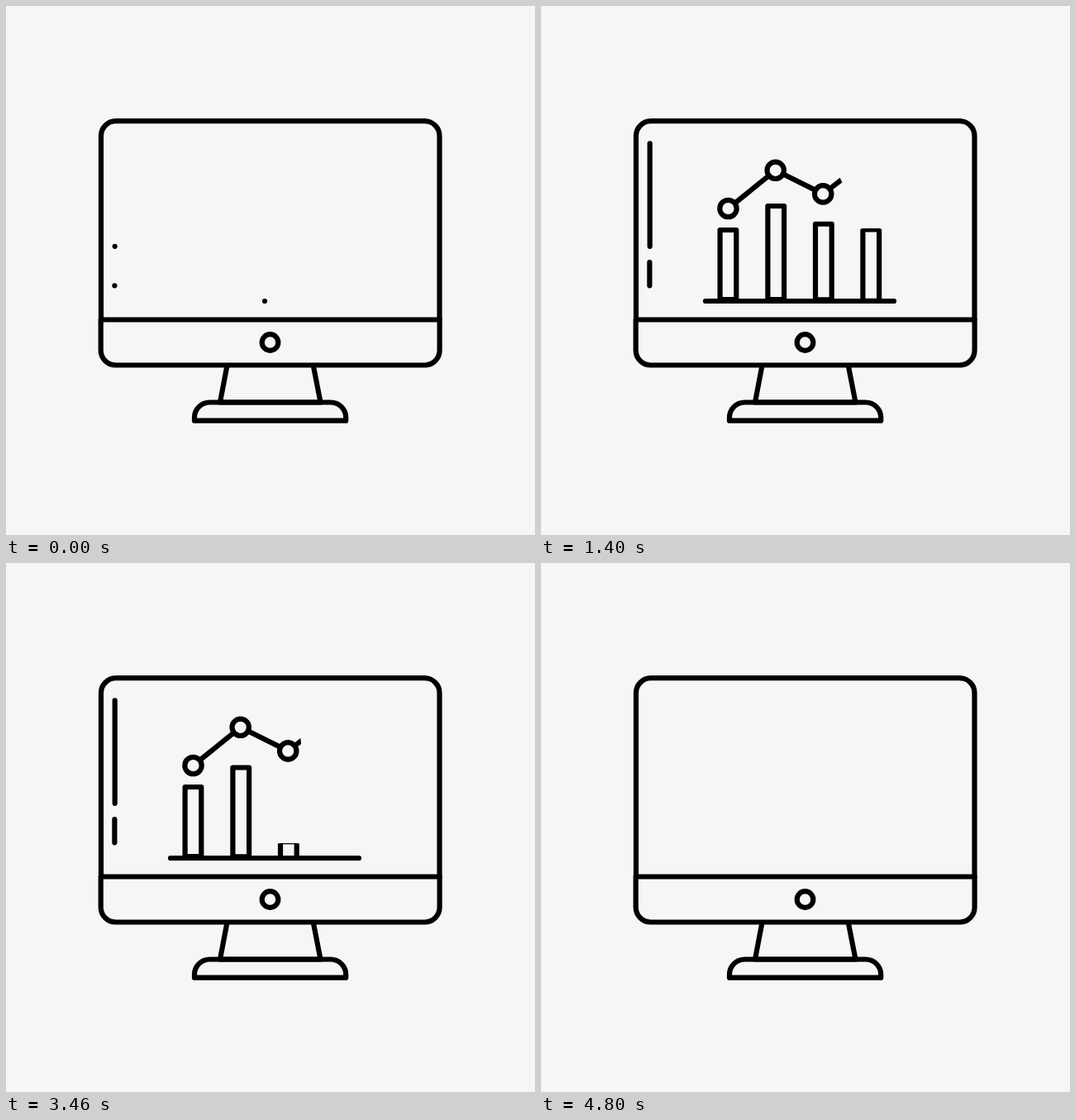
Animation of 640 by 640 pixels, one loop 4940 ms. Source, as an HTML page:

```html
<!DOCTYPE html>
<html lang="en">
<head>
<meta charset="utf-8">
<title>Chart on a monitor</title>
<style>
  html, body { margin: 0; width: 100%; height: 100%; overflow: hidden; background: #f5f6f8; }
  svg { display: block; width: 100%; height: 100%; }
</style>
</head>
<body>
<svg viewBox="0 0 640 640" fill="none" stroke="#000" stroke-width="6.2" stroke-linecap="round" stroke-linejoin="round">
  <defs>
    <clipPath id="reveal"><rect id="cut" x="-700" y="-700" width="700" height="1400"/></clipPath>
  </defs>
  <g id="monitor">
    <path d="M115 379.5V157.2a18 18 0 0 1 18-18H506.5a18 18 0 0 1 18 18V379.5"/>
    <path d="M114.7 379.5H524.6V416.5a18 18 0 0 1-18 18H132.7a18 18 0 0 1-18-18Z"/>
    <circle cx="319.5" cy="407" r="9.8"/>
    <path d="M267.3 436L259 479.5H380.5L372 436"/>
    <path d="M228 501.7V498a18.5 18.5 0 0 1 18.5-18.5H392.7a18.5 18.5 0 0 1 18.5 18.5V501.7Z"/>
  </g>
  <g id="bars"></g>
  <line id="axis"/>
  <line id="long"/>
  <line id="short"/>
  <g id="trend" clip-path="url(#reveal)"></g>
</svg>
<script>
const LOOP = 4940;
const $ = id => document.getElementById(id);

function add(parent, tag, attrs) {
  const el = document.createElementNS('http://www.w3.org/2000/svg', tag);
  set(el, attrs);
  parent.appendChild(el);
  return el;
}

function set(el, attrs) {
  for (const k in attrs) el.setAttribute(k, attrs[k]);
}

// Cubic easing with handles (a, 0) and (b, 1).
const bezier = (a, b) => x => {
  if (x <= 0) return 0;
  if (x >= 1) return 1;
  let lo = 0, hi = 1;
  for (let i = 0; i < 30; i++) {
    const s = (lo + hi) / 2, r = 1 - s;
    if (3 * a * s * r * r + 3 * b * s * s * r + s * s * s < x) lo = s; else hi = s;
  }
  return lo * lo * (3 - 2 * lo);
};

const snap = bezier(1 / 3, 0);
const even = bezier(1 / 6, 5 / 6);
const glide = bezier(0.22, 0.84);
const ramp = (t, start, dur, ease) => ease((t - start) / dur);

// Bars: left edge and top of the stroke's centre line
const FLOOR = 358;
const bars = [[216.6, 271], [274.4, 242], [332, 259], [389.4, 232]].map(([x, y]) =>
  add($('bars'), 'rect', { x, y, width: 19.7, height: 355 - y }));

// Trend line with its dots
const dots = [[226.5, 245], [283.7, 198.8], [341.2, 227.4], [413.3, 172]];
add($('trend'), 'polyline', { points: dots.join(' ') });
dots.forEach(([cx, cy]) => add($('trend'), 'circle', { cx, cy, r: 10.2, fill: '#f5f6f8' }));

const segs = dots.slice(1).map(([x, y], i) => {
  const [px, py] = dots[i], len = Math.hypot(x - px, y - py);
  return { x: px, y: py, len, ux: (x - px) / len, uy: (y - py) / len };
});
const PAD = 13.6;
const total = segs.reduce((sum, s) => sum + s.len, 2 * PAD);

// The cutting edge turns smoothly from one segment to the next.
function placeCut(p) {
  let d = p * total - PAD, i = 0;
  while (i < segs.length - 1 && d > segs[i].len) d -= segs[i++].len;
  const s = segs[i];
  let nx = s.ux, ny = s.uy;
  const bend = (other, dist) => {
    if (!other) return;
    const w = Math.min(1, Math.max(0, (32 - dist) / 12));
    const bx = s.ux + other.ux, by = s.uy + other.uy, m = Math.hypot(bx, by);
    nx += w * (bx / m - s.ux);
    ny += w * (by / m - s.uy);
  };
  bend(segs[i - 1], d);
  bend(segs[i + 1], s.len - d);
  const angle = Math.atan2(ny, nx) * 180 / Math.PI;
  set($('cut'), { transform: `translate(${s.x + s.ux * d} ${s.y + s.uy * d}) rotate(${angle})` });
}

function drawLine(el, shown, x1, y1, x2, y2) {
  set(el, { x1, y1, x2, y2, visibility: shown ? 'visible' : 'hidden' });
}

// Upright line that grows from its foot and later vanishes from there too
function drawUpright(el, x, top, foot, grown, gone) {
  const h = foot - top;
  drawLine(el, grown > gone, x, foot - h * grown, x, foot - h * gone);
}

function render(t) {
  const grown = ramp(t, 0, 600, snap);
  const gone = ramp(t, 4200, 600, snap);
  drawUpright($('long'), 131.7, 166.3, 290.8, grown, gone);
  drawUpright($('short'), 131.4, 310, 338.3, grown, gone);

  const half = 114 * (grown - ramp(t, 4200, 600, even));
  drawLine($('axis'), half > 0, 313 - half, 357, 313 + half, 357);

  bars.forEach((bar, i) => {
    const k = ramp(t, 600 + 200 * i, 600, snap) - ramp(t, 3600 - 200 * i, 600, snap);
    set(bar, {
      transform: `translate(0 ${FLOOR}) scale(1 ${k}) translate(0 ${-FLOOR})`,
      visibility: k > 0.001 ? 'visible' : 'hidden'
    });
  });

  const trend = ramp(t, 600, 1200, even) - ramp(t, 3000, 1200, glide);
  set($('trend'), { visibility: trend > 0 ? 'visible' : 'hidden' });
  placeCut(trend);
}

function tick() {
  render(performance.now() % LOOP);
  requestAnimationFrame(tick);
}
tick();
</script>
</body>
</html>
```
